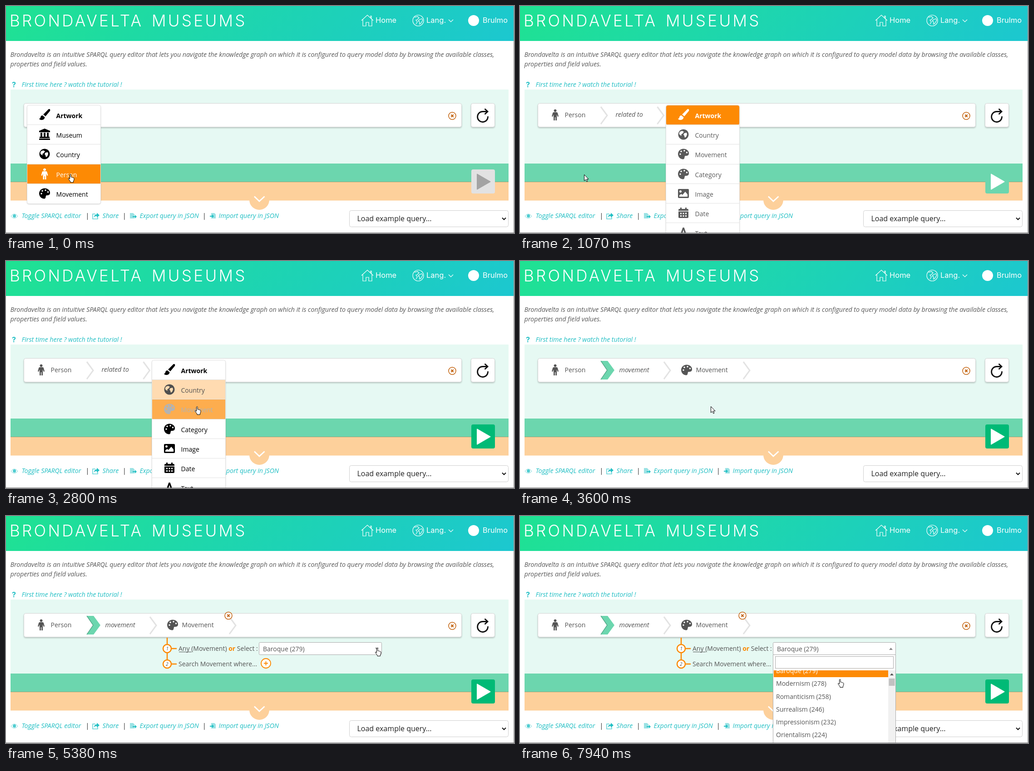
Recreate the animation shown at these times as an HTML page. Size 1119 by 500 pixels, loop 8000 ms.

```html
<!DOCTYPE html>
<html lang="en">
<head>
<meta charset="utf-8">
<title>Query editor</title>
<style>
html, body { margin: 0; width: 100%; height: 100%; overflow: hidden; background: #fff; }
svg { display: block; }
text { font: 14px "Open Sans", "Noto Sans", sans-serif; fill: currentColor; }
.it { font-style: italic; font-size: 14.22px; }
.b { font-weight: 700; }
.head text { font-family: Inter, sans-serif; font-size: 16.5px; fill: #fff; }
.head .title { font-size: 35px; font-weight: 300; letter-spacing: 4.3px; }
.line { fill: none; stroke: #fff; stroke-width: 1.2; }
.teal { color: #22bfc4; }
.icon { fill: currentColor; fill-rule: evenodd; }
.sep { fill: none; stroke: #e3e3e3; stroke-width: 3; }
.card { fill: #fff; stroke: #d6d6d6; filter: drop-shadow(0 2px 1.5px rgba(0,0,0,.2)); }
.menu { fill: #fff; stroke: #e2e2e2; filter: drop-shadow(0 1px 1px rgba(0,0,0,.16)); }
.orange { fill: #fff; stroke: #fc8800; stroke-width: 2.5; }
.close { fill: #fff; stroke: #c2610c; stroke-width: 1.5; }

.start, .picked, .related, .menu2, .moved, .branch, .shut, .open, .hand, .arrow, .beam,
.menu2 .row, .wake, .play, .tri, .scroll, .thumb, .up, #cursor {
  animation: 8s step-end infinite;
}
.start { animation-name: start; }
.picked { animation-name: picked; }
.related { animation-name: related; }
.menu2 { animation-name: related; }
.moved { animation-name: moved; }
.branch { animation-name: branch; }
.shut { animation-name: shut; }
.open { animation-name: open; }
@keyframes start { 0% { visibility: visible } 13.375% { visibility: hidden } }
@keyframes picked { 0% { visibility: hidden } 13.375% { visibility: visible } }
@keyframes related { 0%, 45% { visibility: hidden } 13.375% { visibility: visible } }
@keyframes moved { 0% { visibility: hidden } 45% { visibility: visible } }
@keyframes branch { 0% { visibility: hidden } 48.375% { visibility: visible } }
@keyframes shut { 0%, 75.375% { visibility: hidden } 48.375% { visibility: visible } }
@keyframes open { 0% { visibility: hidden } 75.375% { visibility: visible } }

/* --h is how far a menu row is highlighted */
.row { --h: 0; color: color-mix(in srgb, #fff calc(var(--h) * 100%), var(--ink)); }
.row .bg { fill: #fd8a04; opacity: var(--h); }
.wake { --ink: #000; }
.menu2 .wake { animation-name: wake; }
.start .Person { --h: 1; }
.menu2 .Artwork { animation-name: art; }
.menu2 .Country { animation-name: country; }
.menu2 .Movement { animation-name: movement; }
@keyframes wake { 0% { --ink: #5a5a5a } 22.625% { --ink: #505050 } 24.5% { --ink: #282828 } 26% { --ink: #000 } }
@keyframes art { 0% { --h: 1 } 29.75% { --h: .55 } 31.625% { --h: 0 } }
@keyframes country { 0%, 36.5% { --h: 0 } 29.75% { --h: .45 } 31.625% { --h: 1 } 33.5% { --h: .8 } 35% { --h: .31 } }
@keyframes movement { 0% { --h: 0 } 33.5% { --h: .2 } 35% { --h: .7 } 36.5% { --h: 1 } }

.play { animation-name: play; }
.tri { animation-name: tri; }
@keyframes play { 0% { fill: #e2e2e2 } 13.375% { fill: #6cd6ae } 15% { fill: #35c891 } 16.5% { fill: #00ba76 } }
@keyframes tri { 0% { color: #a3a3a3 } 13.375% { color: #fff } }

.scroll { animation-name: scroll; }
.thumb { animation-name: thumb; }
.up { animation-name: up; }
@keyframes scroll {
  0% { transform: none } 96.25% { transform: translateY(-2px) }
  97.75% { transform: translateY(-7px) } 99.25% { transform: translateY(-13px) }
}
@keyframes thumb { 0% { transform: none } 97.75% { transform: translateY(1px) } }
@keyframes up { 0% { fill: #a0a0a0 } 96.25% { fill: #505050 } }

#cursor { animation-name: move; }
.hand { animation-name: hand; }
.arrow { animation-name: arrow; }
.beam { animation-name: beam; }
@keyframes hand {
  0%, 22.625%, 55.125%, 90.875% { visibility: visible }
  13.375%, 45%, 87.875% { visibility: hidden }
}
@keyframes arrow { 0%, 22.625%, 48.375% { visibility: hidden } 13.375%, 45% { visibility: visible } }
@keyframes beam { 0%, 55.125%, 90.875% { visibility: hidden } 48.375%, 87.875% { visibility: visible } }
@keyframes move {
  0% { transform: translate(141px, 370px) }
  13.375% { transform: translate(141px, 371px) }
  16.5% { transform: translate(152px, 362px) }
  18.125% { transform: translate(190px, 335px) }
  19.625% { transform: translate(240px, 300px) }
  21.125% { transform: translate(293px, 264px) }
  22.625% { transform: translate(335px, 243px) }
  24.5% { transform: translate(395px, 232px) }
  26% { transform: translate(428px, 227px) }
  27.875% { transform: translate(428px, 252px) }
  29.75% { transform: translate(428px, 285px) }
  31.625% { transform: translate(426px, 292px) }
  33.5% { transform: translate(422px, 308px) }
  35% { transform: translate(420px, 320px) }
  48.375% { transform: translate(421px, 325px) }
  49.875% { transform: translate(430px, 320px) }
  51.375% { transform: translate(456px, 308px) }
  53.25% { transform: translate(518px, 283px) }
  55.125% { transform: translate(583px, 281px) }
  56.625% { transform: translate(643px, 282px) }
  58.5% { transform: translate(739px, 284px) }
  60.375% { transform: translate(770px, 284px) }
  62.25% { transform: translate(790px, 285px) }
  63.75% { transform: translate(805px, 287px) }
  65.375% { transform: translate(813px, 288px) }
  67.25% { transform: translate(817px, 290px) }
  80.75% { transform: translate(810px, 290px) }
  82.625% { transform: translate(790px, 293px) }
  84.5% { transform: translate(757px, 297px) }
  86% { transform: translate(729px, 300px) }
  87.875% { transform: translate(723px, 316px) }
  89.375% { transform: translate(719px, 328px) }
  90.875% { transform: translate(717px, 343px) }
  94.375% { transform: translate(711px, 351px) }
  96.25% { transform: translate(706px, 355px) }
  99.25% { transform: translate(704px, 359px) }
}
</style>
</head>
<body>
<svg width="1119" height="500" viewBox="0 0 1119 500">
<defs>
  <linearGradient id="sky" gradientUnits="userSpaceOnUse" x1="260.5" y1="-260.5" x2="858.5" y2="337.5">
    <stop offset="0" stop-color="#1fe292"/><stop offset="1" stop-color="#1cc7d0"/>
  </linearGradient>
  <clipPath id="list"><rect x="559" y="340" width="252" height="160"/></clipPath>
  <path id="brush" d="M11-13Q13-12 12-9L2 3-3-1 7-11Q9.500-14 11-13ZM-4.500 1L.5 5Q-.5 11-7 11-11 11-12 8-9 8-9 5-8 1-4.500 1Z"/>
  <path id="museum" d="M0-13L12-8V-5H-12V-8ZM-9-4h4v9h-4ZM-2-4h4v9h-4ZM5-4h4v9h-4ZM-11 5H11V8H-11ZM-12 9H12V12H-12Z"/>
  <path id="globe" d="M0-11.500a11.500 11.500 0 1 0 .01 0ZM-8-6L-3-8 1-6-2-2-5 0-4 3-8 1-9.500-2ZM2-3L7-4 8 0 6 5 3 7 2 3 0 0Z"/>
  <path id="person" d="M0-12.500a3 3 0 1 0 .01 0ZM-3.500-6H3.500Q5-6 5.500-4L7.500 3 5.500 4 3.500-1V12H.7V5H-.7V12H-3.500V-1L-5.500 4-7.500 3-5.500-4Q-5-6-3.500-6Z"/>
  <path id="palette" d="M0-11.500C7-11.500 12-7 12-1.500 12 4 7 4 5 4 1 4 4 10 0 11.500-7 12-12 6-12 0-12-6.500-6.500-11.500 0-11.500ZM-7-1.500a1.700 1.700 0 1 0 .01 0ZM-5-7.500a1.700 1.700 0 1 0 .01 0ZM2-9a1.700 1.700 0 1 0 .01 0ZM7.500-5a1.700 1.700 0 1 0 .01 0Z"/>
  <path id="image" d="M-10-10H10Q12-10 12-8V8Q12 10 10 10H-10Q-12 10-12 8V-8Q-12-10-10-10ZM-6.500-7a2.500 2.500 0 1 0 .01 0ZM-9 7H9V2L4-4-2 3-5 1-9 4Z"/>
  <path id="calendar" d="M-7-12h3v3h8v-3h3v3h2q2 0 2 2v2H-11v-2q0-2 2-2h2ZM-11-3.500H11V9q0 2-2 2H-9q-2 0-2-2ZM-7-.5v3h3v-3ZM-1.500-.5v3h3v-3ZM4-.5v3h3v-3ZM-7 5v3h3v-3ZM-1.500 5v3h3v-3ZM4 5v3h3v-3Z"/>
  <path id="letter" d="M-1.500-11H1.500L9 10H5L3 4H-3L-5 10H-9ZM0-6L-2 1H2Z"/>
  <path id="chevron" class="sep" d="M0 0L14 19 0 38"/>
  <g id="cross" class="close"><circle r="8"/><path d="M-2.700-2.700L2.700 2.700M2.700-2.700L-2.700 2.700" stroke-width="2"/></g>
  <path id="page" d="M-5-6H2L5-3V6H-5Z" opacity=".45"/>
  <path id="into" d="M-4 0H1V-3L5 1 1 5V2H-4Z"/>
</defs>

<rect width="1119" height="500" fill="#fff"/>
<g class="head">
  <rect width="1119" height="77" fill="url(#sky)"/>
  <text class="title" x="8" y="45">BRONDAVELTA</text>
  <text class="title" x="321" y="45">MUSEUMS</text>
  <path class="line" d="M783 32L796 20 809 32M786 30V44H793V36H799V44H806V30M803 26V22H805V28"/>
  <text x="814" y="37">Home</text>
  <circle class="line" cx="908" cy="32" r="12"/>
  <path class="line" d="M900 25L906 23 910 26 906 30 903 31 906 35 903 40M911 30L916 28 918 31 914 38 911 40 911 35 908 33Z"/>
  <text x="926" y="37">Lang.</text>
  <path class="line" d="M975 30L980 35 985 30"/>
  <circle cx="1030" cy="32" r="12" fill="#fff"/>
  <text x="1050" y="37">Brulmo</text>
</g>

<g color="#595959">
  <text class="it" x="9.500" y="112">Brondavelta</text>
  <text class="it" x="90" y="112">is an intuitive SPARQL query editor that lets you navigate the knowledge graph on which it is configured to query model data by browsing the available classes,</text>
  <text class="it" x="9.500" y="133">properties and field values.</text>
</g>
<g class="teal">
  <text class="b" x="13" y="178.500" style="font-family:Inter,sans-serif;font-size:16px">?</text>
  <text class="it" x="34.500" y="178">First time here ? watch the tutorial !</text>
</g>

<rect x="10" y="184" width="1097" height="163" fill="#e6f9f3"/>
<rect x="10" y="347" width="1097" height="41" fill="#6cd6ae"/>
<rect x="10" y="388" width="1097" height="40.500" fill="#fdd09b"/>
<rect x="10" y="387" width="1097" height="1" fill="#9fa277"/>
<circle cx="558" cy="427" r="22" fill="#fdd09b"/>
<path d="M547 419.500L558 430 569.500 419.500" fill="none" stroke="#fff" stroke-width="2.800"/>

<rect class="card" x="39.500" y="214.500" width="964" height="52" rx="4"/>
<use href="#cross" x="983" y="242"/>
<rect class="card" x="1024.500" y="214.500" width="52" height="52" rx="4"/>
<path d="M1061.500 243A11.500 11.500 0 1 1 1050 232.500H1061M1054.500 226.500L1061 232.500 1054.500 238.500" fill="none" stroke="#111" stroke-width="2.800"/>
<rect class="play" x="1025" y="360" width="52" height="53" rx="4"/>
<path class="tri" d="M1038 370.500L1066.500 387 1038 403.500Z" fill="currentColor" stroke="currentColor" stroke-width="2" stroke-linejoin="round"/>

<g class="teal">
  <path d="M11 463Q18 453 26 463 18 472 11 463Z" fill="none" stroke="currentColor" opacity=".6"/>
  <circle cx="18.500" cy="462.500" r="3.500" fill="currentColor" opacity=".8"/>
  <text class="it" x="34.500" y="467">Toggle SPARQL editor</text>
  <path d="M197 458H191V469H202V465" fill="none" stroke="currentColor" stroke-width="1.600" opacity=".7"/>
  <path d="M194 466Q194 459 200 459V455.500L206 461 200 466V462.500Q196 462 194 466Z" fill="currentColor"/>
  <text class="it" x="212.500" y="467">Share</text>
  <use class="icon" href="#page" x="278" y="462"/>
  <use class="icon" href="#into" x="283" y="463"/>
  <text class="it" x="294.500" y="467">Export query in JSON</text>
  <use class="icon" href="#page" x="457" y="462"/>
  <use class="icon" href="#into" x="453" y="462"/>
  <text class="it" x="468.500" y="467">Import query in JSON</text>
</g>
<g color="#222"><text x="175.500" y="467">|</text><text x="257" y="467">|</text><text x="433" y="467">|</text></g>

<rect x="756.500" y="450.500" width="350" height="36" rx="4" fill="#fff" stroke="#cfcfcf"/>
<text x="773.500" y="474" style="font-size:16px" color="#222">Load example query...</text>
<path d="M1093 466.500L1097 470.500 1101 466.500" fill="none" stroke="#111" stroke-width="2"/>

<g color="#555">
  <g class="picked">
    <use class="icon" href="#person" x="77.500" y="240"/>
    <text x="98.500" y="245">Person</text>
  </g>
  <g class="related">
    <use href="#chevron" x="178" y="222"/>
    <text class="it" x="210.500" y="244">related to</text>
    <use href="#chevron" x="302.500" y="222"/>
  </g>
  <g class="moved">
    <path d="M178 220H193L208 240.500 193 261H178L192 240.500Z" fill="#6cd6ae"/>
    <path d="M178 220L192 240.500 178 261" fill="none" stroke="#58a98b" stroke-width="1.500"/>
    <text class="it" x="218.500" y="245">movement</text>
    <use href="#chevron" x="317" y="222"/>
    <use class="icon" href="#palette" x="367" y="240"/>
    <text x="387.500" y="245">Movement</text>
    <use href="#chevron" x="492" y="222"/>
  </g>
  <g class="branch">
    <use href="#cross" x="490" y="219.500"/>
    <path class="orange" d="M355 268V326M355 292H376M355 326H376"/>
    <circle class="orange" cx="355" cy="292" r="9"/>
    <circle class="orange" cx="355" cy="326" r="9"/>
    <text class="it" x="352.500" y="295.500" style="font-size:10px">1</text>
    <text class="it" x="352" y="329.500" style="font-size:10px">2</text>
    <text x="380" y="297">Any (Movement) <tspan class="b" fill="#fc8800">or</tspan> Select :</text>
    <path d="M381 299.500H409" stroke="#555"/>
    <text x="380" y="331">Search Movement where...</text>
    <circle class="orange" cx="572.500" cy="324.500" r="10.500" style="stroke-width:1.800"/>
    <path class="orange" d="M568 324.500H577M572.500 320V329" style="stroke-width:1.800"/>
    <rect x="557.500" y="278.500" width="270" height="27" rx="2" fill="#fff" stroke="#aaa"/>
    <text x="566" y="298">Baroque (279)</text>
  </g>
  <path class="shut" d="M813 290H821L817 295Z" fill="#888"/>
  <g class="open">
    <path d="M557.500 305.500H827.500V505H557.500Z" fill="#fff" stroke="#aaa"/>
    <path d="M813 295H821L817 290Z" fill="#888"/>
    <rect x="562.500" y="309.500" width="260" height="26" fill="#fff" stroke="#aaa"/>
    <g clip-path="url(#list)"><g class="scroll" id="options"></g></g>
    <rect x="811" y="340" width="16" height="160" fill="#f1f1f1"/>
    <rect class="thumb" x="812.500" y="357" width="13" height="16" fill="#c1c1c1"/>
    <path class="up" d="M815 351H823L819 346.500Z"/>
  </g>
</g>

<g class="start" id="from"></g>
<g class="menu2" id="to"></g>

<path d="M0 499.500H1119" stroke="#808080"/>
<path d="M1118.500 0V500" stroke="#a0a0a0"/>

<g id="cursor" stroke-linejoin="round">
  <path class="hand" transform="translate(-5 0)" fill="#fff" stroke="#000" d="M4.500 1.500Q6-.2 7 1.500V7L8.300 6.800 9.300 7.600 10.700 7.400 11.700 8.300H12.900L13.900 9.500V13L12.400 16V18.500H6V17L2 11.500Q1 9.800 2.200 9.300L4.500 11Z"/>
  <path class="arrow" fill="#fff" stroke="#000" d="M.5.5V14L3.700 11.200 6 16 8 15 5.800 10.300H10Z"/>
  <path class="beam" fill="none" stroke="#222" stroke-width="1.200" d="M-3-6.500Q0-6.500 0-5 0-6.500 3-6.500M0-5V5M-3 6.500Q0 6.500 0 5 0 6.500 3 6.500"/>
</g>
</svg>

<script>
const rowH = 43.2;
const icons = {
  Artwork: 'brush', Museum: 'museum', Country: 'globe', Person: 'person', Movement: 'palette',
  Category: 'palette', Image: 'image', Date: 'calendar', Text: 'letter'
};

function row(name, i, x) {
  const y = Math.round(219 + i * rowH);
  return `<g class="row ${name}">
    ${i ? `<path d="M${x} ${y - 0.5}h161" stroke="#e2e2e2"/>` : ''}
    <rect class="bg" x="${x}" y="${y}" width="161" height="43" rx="${i ? 0 : 4}"/>
    <use class="icon" href="#${icons[name]}" x="${x + 38}" y="${y + 21}"/>
    <text class="${i ? '' : 'b'}" x="${x + 63.5}" y="${y + 28}">${name}</text></g>`;
}

function menu(id, x, names) {
  document.getElementById(id).innerHTML =
    `<rect class="menu" x="${x - 0.5}" y="218.5" width="162" height="${Math.round(names.length * rowH) + 1}" rx="4"/>
     <g class="wake">${names.map((name, i) => row(name, i, x)).join('')}</g>`;
}

menu('from', 47, ['Artwork', 'Museum', 'Country', 'Person', 'Movement']);
menu('to', 322, ['Artwork', 'Country', 'Movement', 'Category', 'Image', 'Date', 'Text']);

const options = ['Baroque (279)', 'Modernism (278)', 'Romanticism (258)', 'Surrealism (246)',
  'Impressionism (232)', 'Orientalism (224)'];
document.getElementById('options').innerHTML =
  '<rect x="559" y="340" width="252" height="28" fill="#fd8a04"/>' +
  options.map((label, i) =>
    `<text x="564" y="${359 + i * 28.25}" color="${i ? '#555' : '#fff'}">${label}</text>`).join('');
</script>
</body>
</html>
```
